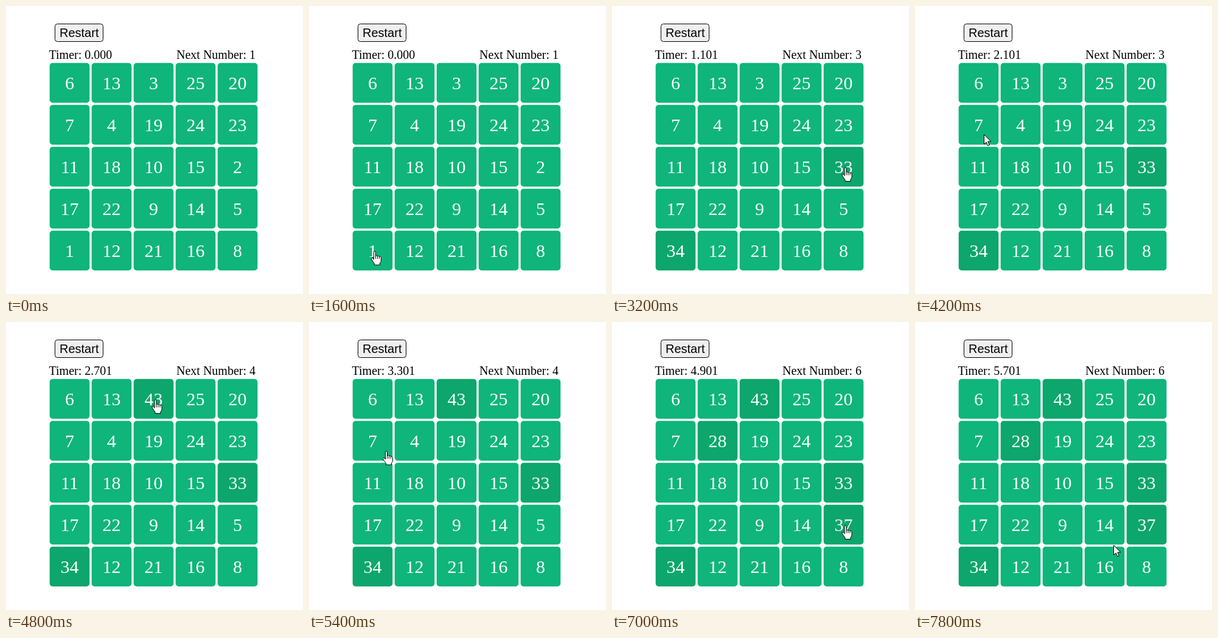
Write an HTML page that moves like this. It is 488 px wide and 474 px high and loops after 8000 ms.

```html
<!DOCTYPE html>
<html lang="en">
<head>
<meta charset="utf-8">
<title>Number Grid</title>
<style>
  html, body { margin: 0; width: 100%; height: 100%; overflow: hidden; background: #fff; }
  svg { display: block; width: 488px; height: 474px; font: 20px "Liberation Serif", "Times New Roman", serif; }
  .tile rect { fill: #0fb57a; }
  .tile.done rect { fill: #0da66c; }
  .tile text { fill: #fff; font-size: 30px; text-anchor: middle; }
  .button { font-family: "Liberation Sans", Arial, sans-serif; }
  #cursor path { fill: #fff; stroke: #000; stroke-linejoin: round; }
</style>
</head>
<body>
<svg viewBox="0 0 488 474">
  <rect x="80.5" y="29.5" width="79" height="29" rx="4" fill="#efefef" stroke="#000"/>
  <text class="button" x="88" y="51">Restart</text>
  <text id="timer" x="70.5" y="87"></text>
  <text id="next" x="280" y="87"></text>
  <g id="grid"></g>
  <g id="cursor">
    <path id="arrow" d="M.5 .5V16.5L4.2 13L6.8 19L9.3 18L6.8 12H11.8Z"/>
    <g id="hand" transform="translate(0 1)">
      <path d="M-1.5 14V2Q-1.5 .5 0 .5T1.5 2V8Q3 6.7 4.5 8.5Q6 7.4 7.5 9.3Q9 8.3 10.5 10.5V16Q10.5 18.5 8.5 20V23H-.5V20.5Q-3 17.5-5 14Q-6 12-4.5 11.3Q-3 11-1.5 14Z"/>
      <path d="M1.5 8V13M4.5 8.5V13M7.5 9.3V13"/>
    </g>
  </g>
</svg>
<script>
const LOOP = 8000, STEP = 200, START = 2099, HOLD = 200;
const COLUMNS = 5, PITCH = 69, SIZE = 65.6, LEFT = 71.7, TOP = 93.7;

const labels = "6 13 3 25 20 7 4 19 24 23 11 18 10 15 2 17 22 9 14 5 1 12 21 16 8".split(" ");

// Tiles are clicked in counting order; each then shows a new label
const clicks = [
  { time: START, label: "34" },
  { time: 3000, label: "33" },
  { time: 4800, label: "43" },
  { time: 5800, label: "28" },
  { time: 6900, label: "37" }
];

const tilePosition = i => [LEFT + i % COLUMNS * PITCH, TOP + Math.floor(i / COLUMNS) * PITCH];

// The pointer rests on each tile around its click
const rests = clicks.flatMap(({ time }, i) => {
  const [left, top] = tilePosition(labels.indexOf(String(i + 1)));
  const x = left + SIZE / 2 + 3, y = top + SIZE / 2;
  return [{ time: time - HOLD, x, y }, { time: time + HOLD, x, y }];
});

// Between clicks it wanders while searching
const wander = [
  { time: 1200, x: -40, y: 400 },
  { time: 1500, x: 108, y: 402 },
  { time: 3200.5, x: 399, y: 248 },
  { time: 3400, x: 450, y: 240 },
  { time: 4100, x: 38, y: 211 },
  { time: 4200, x: 113, y: 211 },
  { time: 5400, x: 127, y: 211 },
  { time: 6400, x: 323, y: 286 },
  { time: 7600, x: 326, y: 367 }
];
const path = [...rests, ...wander].sort((a, b) => a.time - b.time);

function pointerAt(t) {
  const i = path.findIndex(p => p.time > t);
  if (i === 0) return path[0];
  if (i < 0) return path[path.length - 1];
  const a = path[i - 1], b = path[i], k = (t - a.time) / (b.time - a.time);
  return { x: a.x + (b.x - a.x) * k, y: a.y + (b.y - a.y) * k };
}

function overTile({ x, y }) {
  const inside = v => v >= 0 && v < COLUMNS * PITCH && v % PITCH < SIZE;
  return inside(x - LEFT) && inside(y - TOP);
}

const byId = id => document.getElementById(id);
byId("grid").innerHTML = labels.map((label, i) =>
  `<g class="tile" transform="translate(${tilePosition(i)})">
    <rect width="${SIZE}" height="${SIZE}" rx="5"/>
    <text x="${SIZE / 2}" y="43.3">${label}</text>
  </g>`).join("");
const tiles = [...byId("grid").children];

function draw(t) {
  const done = clicks.filter(({ time }) => t >= time).length;
  byId("timer").textContent = "Timer: " + (Math.max(0, t - START) / 1000).toFixed(3);
  byId("next").textContent = "Next Number: " + (done + 1);
  tiles.forEach((tile, i) => {
    const clicked = labels[i] <= done;
    tile.classList.toggle("done", clicked);
    tile.lastElementChild.textContent = clicked ? clicks[labels[i] - 1].label : labels[i];
  });

  const { x, y } = pointerAt(t);
  const hand = overTile(pointerAt(t - 60)); // the pointer shape lags a little
  byId("cursor").setAttribute("transform", `translate(${x} ${y})`);
  byId("hand").style.display = hand ? "" : "none";
  byId("arrow").style.display = hand ? "none" : "";
}

function frame() {
  const t = performance.now() % LOOP;
  draw(Math.floor(t / STEP) * STEP);
  requestAnimationFrame(frame);
}
frame();
</script>
</body>
</html>
```
